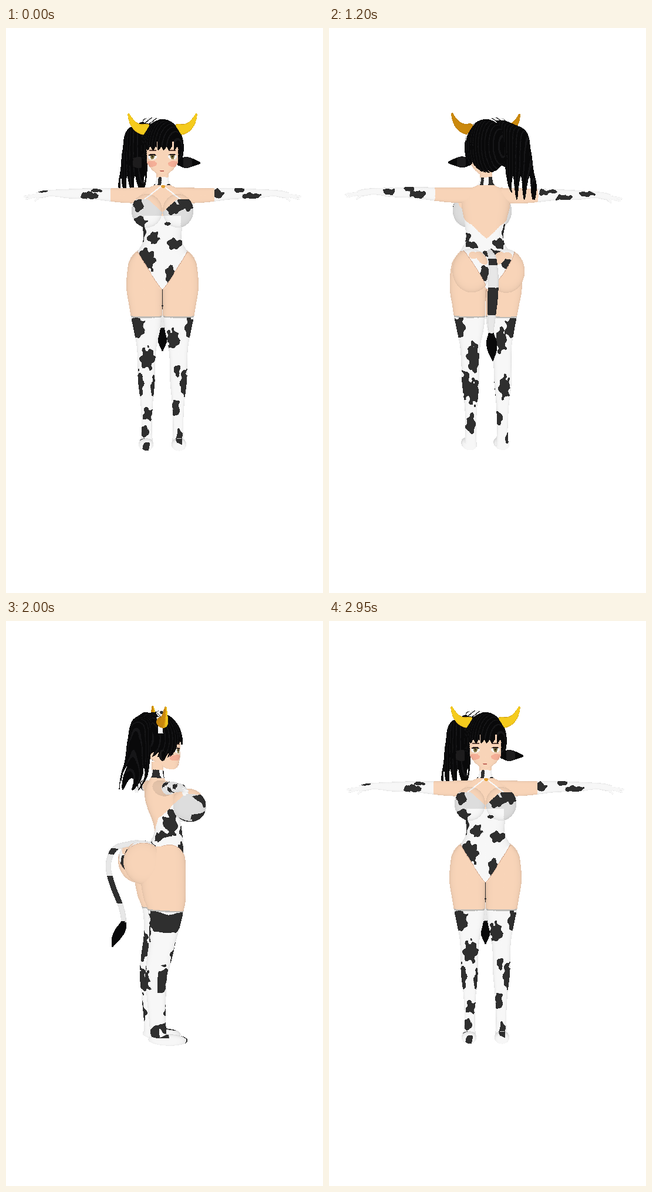
An HTML page with a canvas that plays this animation: 540x960 px, repeating every 3200 ms.

```html
<!DOCTYPE html>
<html>
<head>
<meta charset="utf-8">
<style>
html, body { margin: 0; width: 100%; height: 100%; overflow: hidden; background: #fff; }
canvas { display: block; }
</style>
</head>
<body>
<canvas id="stage" width="540" height="960"></canvas>
<script>
// A turntable figure: surfaces are sampled once into coloured points,
// then rotated and depth-tested per pixel.
const W = 540, H = 960, AXIS = 266, STEP = 0.62, FAR = 1900, LOOP = 3200;
const { sin, cos, abs, max, min, hypot, ceil, PI } = Math;

const WHITE = [248, 248, 248], DARK = [48, 48, 48], BLACK = [10, 10, 11];
const SKIN = [249, 213, 185], BLUSH = [246, 176, 152], GREY = [222, 222, 222];

// Spots: x, y, side (1 front, -1 back, 0 both), half width, half height
const bodySpots = [
  [-15, 356, 1, 9, 10], [21, 367, 1, 12, 9], [-26, 394, 1, 13, 19], [14, 421, 1, 9, 18],
  [-40, 301, 1, 8, 10], [-37, 327, 1, 10, 8], [19, 306, 1, 13, 10], [38, 299, 1, 12, 11],
  [8, 332, 1, 6, 3], [-32, 347, 0, 4, 13], [32, 355, -1, 6, 7],
  [24, 369, -1, 10, 6], [-21, 366, -1, 10, 9], [-8, 384, -1, 17, 7],
  [-25, 398, -1, 7, 12], [10, 414, -1, 8, 13],
  [-126, 284, 1, 16, 6], [-112, 276, 0, 9, 3], [-204, 277, 1, 10, 2], [94, 281, 1, 9, 7],
  [152, 285, 1, 16, 5], [131, 275, 0, 10, 4], [-134, 286, -1, 15, 5], [-96, 278, -1, 8, 5],
  [118, 284, -1, 14, 6], [165, 280, -1, 11, 5], [-172, 279, -1, 13, 4]
];
const legSpots = [
  [-42, 507, 0, 12, 19], [-25, 560, 1, 12, 18], [-39, 606, 1, 7, 22], [-16, 612, 1, 4, 18],
  [-25, 656, 1, 8, 11], [-30, 686, 1, 6, 9], [-27, 706, 1, 6, 7], [47, 507, 0, 9, 19],
  [18, 527, 1, 11, 16], [25, 580, 1, 5, 10], [37, 602, 0, 7, 22], [23, 645, 1, 6, 16],
  [29, 693, 1, 5, 11], [24, 557, -1, 10, 24], [24, 614, -1, 10, 20], [28, 667, -1, 7, 16],
  [-23, 528, -1, 9, 20], [-28, 606, -1, 9, 18], [-20, 658, -1, 5, 11], [-35, 694, -1, 5, 11]
];

const points = [];

function put(x, y, z, nx, nz, paint) {
  const c = paint(x, y, z, nx, nz);
  if (c) points.push(x, y, z, nx, nz, c[0], c[1], c[2]);
}

function ball(x, y, z, rx, ry, rz, paint) {
  const rows = ceil(PI * max(rx, ry, rz) / STEP);
  for (let i = 0; i <= rows; i++) {
    const a = PI * i / rows, r = sin(a), cols = ceil(2 * PI * max(rx, rz) * r / STEP) + 1;
    for (let j = 0; j < cols; j++) {
      const b = 2 * PI * j / cols, nx = r * cos(b), nz = r * sin(b);
      put(x + rx * nx, y - ry * cos(a), z + rz * nz, nx, nz, paint);
    }
  }
}

// Smooth curve through rows, with the first column as parameter
function rowAt(rows, i, f) {
  const p = rows[i], q = rows[i + 1], before = rows[max(0, i - 1)], after = rows[min(rows.length - 1, i + 2)];
  const d = q[0] - p[0], f2 = f * f, f3 = f2 * f;
  return p.map((v, k) => {
    const m = d * (q[k] - before[k]) / (q[0] - before[0]);
    const n = d * (after[k] - v) / (after[0] - p[0]);
    return (2 * f3 - 3 * f2 + 1) * v + (f3 - 2 * f2 + f) * m + (3 * f2 - 2 * f3) * q[k] + (f3 - f2) * n;
  });
}

// Rows: position along, centre across, radius across, front z, back z
function tube(rows, paint, side = 1, sideways = false) {
  for (let i = 0; i < rows.length - 1; i++) {
    const jump = rows[i].map((v, k) => abs(rows[i + 1][k] - v));
    const count = ceil((jump[0] + jump[2] + max(jump[3], jump[4]) * 0.6) / STEP);
    for (let s = 0; s < count; s++) {
      const [along, mid, r, front, back] = rowAt(rows, i, s / count);
      const depth = (front - back) / 2, cols = ceil(2 * PI * max(r, depth) / STEP);
      for (let j = 0; j < cols; j++) {
        const a = 2 * PI * j / cols, c = cos(a), n = sin(a);
        const across = mid + r * c, z = (front + back) / 2 + depth * n;
        if (sideways) put(side * along, across, z, 0, n, paint);
        else put(side * across, along, z, side * c, n, paint);
      }
    }
  }
}

function cloth(spots, x, y, nz, base = WHITE) {
  const wobble = 0.16 * sin(y * 0.42 + x * 0.3) + 0.12 * sin(x * 0.6 - y * 0.21);
  for (const [cx, cy, s, rx, ry] of spots)
    if (abs(y - cy) < ry * 1.3 && s * nz >= 0 && hypot((x - cx) / rx, (y - cy) / ry) + wobble < 1) return DARK;
  return base;
}

function bodyPaint(x, y, z, nx, nz, base) {
  const w = abs(x);
  if (y < 267) {
    if (y < 253) return SKIN;
    return sin(x * 0.4 + z * 0.3) < -0.1 ? DARK : WHITE;
  }
  if (nz > 0 && hypot(x - 1, y - 269) < 3) return [226, 160, 50];
  const top = 291 + 22 * max(0, 1 - w / 24) + max(0, 30 - z) * 1.05;
  if (y < top) return nz > 0 && y < 293 && abs(w - (y - 267) * 1.25) < 1.7 ? WHITE : SKIN;
  if (y > 378) {
    const edge = 41 * max(0, (442 - y) / 62) ** 0.9;
    if (w > edge) return w < edge + 1.2 ? [216, 176, 152] : SKIN;
  }
  return cloth(bodySpots, x, y, nz, base);
}
const bustPaint = (x, y, z, nx, nz) => bodyPaint(x, y, z, nx, nz, y > 318 && abs(x) < 30 ? WHITE : GREY);

function legPaint(x, y, z, nx, nz) {
  if (y < 488) return bodyPaint(x, y, z, nx, nz);
  return y < 490 ? [190, 188, 184] : cloth(legSpots, x, y, nz);
}
const armPaint = (x, y, z, nx, nz) => abs(x) < 88 ? SKIN : cloth(bodySpots, x, y, nz);

function facePaint(x, y, z, nx, nz) {
  if (nz < 0.2) return SKIN;
  const ex = abs(x) - 16.5, ey = y - 218;
  if (ex * ex / 56 + ey * ey / 24 < 1) {
    if (ey < -2.4) return [40, 30, 28];
    if (ex * ex / 11 + ey * ey / 18 < 1) return hypot(ex, ey) < 1.5 ? [50, 44, 24] : [140, 126, 74];
    return WHITE;
  }
  if (abs(y - 207.5) < 0.7 && abs(ex) < 6) return [90, 64, 54];
  if (abs(x + 1) < 3.5 && abs(y - 242) < 0.8) return [196, 104, 92];
  return hypot((abs(x) - 18) / 9, (y - 230) / 5) < 1 ? BLUSH : SKIN;
}

const strand = (x, y, z) => sin(x * 0.9 + z * 0.7 + y * 0.05) > 0.75 ? [23, 23, 25] : BLACK;

function hairPaint(x, y, z, nx, nz) {
  if (nz > 0.1 && abs(x) < 27 && y > 204 + 3 * sin(x * 0.7)) return null;
  if (nz > 0.1 && y > 192 && (abs(x - 18) < 1.8 || abs(x + 9) < 0.8)) return null;
  const end = z > 8 ? 238 : z > -28 ? 227 : 245;
  if (y > end + 4 * sin(x + z)) return null;
  return abs(z + 10) < 4 && y < 191 && abs(x) > 20 ? WHITE : strand(x, y, z);
}
const tailHairPaint = (x, y, z) => y > 270 + 20 * sin(x * 0.45 + z * 0.15) ? null : strand(x, y, z);
const hornPaint = (x, y, z, nx, nz) => nz > 0.25 ? [246, 204, 30] : nz > -0.1 ? [224, 160, 18] : [204, 138, 14];
const tailPaint = (x, y) => (y > 437 && y < 482) || (y > 391 && y < 401) ? DARK : [232, 232, 232];

// Torso and head
tube([[240, 0, 10, 0, -18], [262, 0, 11, 2, -18], [268, 0, 16, 3, -20], [274, 0, 30, 6, -23],
  [282, 0, 40, 14, -27], [300, 0, 41, 20, -29], [320, 0, 37, 24, -24], [340, 0, 33, 30, -16],
  [360, 0, 32, 33, -13], [378, 0, 41, 35, -22], [395, 0, 54, 33, -40], [405, 0, 53, 33, -40],
  [420, 0, 40, 33, -38], [442, 0, 6, 24, -20]], bodyPaint);
tube([[185, 0, 26, 28, -38], [205, 0, 28, 30, -38], [225, 0, 27, 30, -32], [238, 0, 19, 28, -14],
  [246, 0, 10, 25, 0], [250, 0, 2, 20, 10]], facePaint);
ball(0, 203, -8, 36, 48, 42, hairPaint);
ball(-18, 157, -7, 15, 5, 6, (x, y) => sin(x * 0.7 + y) > 0.7 ? DARK : WHITE);
tube([[157, -22, 8, -22, -36], [172, -41, 19, -26, -58], [205, -47, 22, -28, -67], [240, -50, 23, -32, -72],
  [268, -54, 23, -38, -80], [296, -58, 14, -56, -84]], tailHairPaint);

for (const side of [-1, 1]) {
  ball(side * 26, 310, 40, 25, 28, 29, bustPaint);
  ball(side * 29, 411, -38, 31, 36, 33, bodyPaint);
  tube([[383, 28, 18, 25, -22], [400, 30, 27, 32, -40], [440, 31, 30, 33, -42], [470, 29, 27.5, 33, -37],
    [488, 27.5, 26, 30, -30], [510, 26.5, 22.5, 25, -27], [540, 27, 16.5, 17, -27], [570, 27.5, 14.5, 10, -31],
    [600, 27.5, 14, 2, -34], [640, 27, 10, 0, -31], [680, 27, 8.5, 0, -27], [708, 27, 10, 2, -26]], legPaint, side);
  ball(side * 28, 706, 4, 12, 9, 33, legPaint);

  // Arm and fingers
  tube([[25, 283, 12, 4, -22], [55, 284, 12.5, 4, -20], [86, 283, 11, 3, -18], [120, 281, 9, 1, -16],
    [160, 281, 7.5, 0, -15], [190, 280, 5, -3, -13], [205, 282, 5.5, -3, -13], [216, 284, 4.5, -4, -12]],
    armPaint, side, true);
  for (const [x, y] of [[237, 286], [234, 290], [218, 293]])
    for (let f = 0; f <= 1; f += 0.06)
      ball(side * (206 + (x - 206) * f), 282 + (y - 282) * f, -8, 2.2 - f, 2.2 - f, 2.5, () => WHITE);

  // Horn and ear
  for (let t = 0; t <= 1; t += 0.025) {
    const r = 8.5 * (1 - t) ** 0.8 + 0.8, k = 2 * t * (1 - t);
    ball(side * (28 * (1 - t) ** 2 + 50 * k + 58 * t * t), 172 * (1 - t) ** 2 + 173 * k + 145 * t * t, -6, r, r, r, hornPaint);
  }
  tube([[26, 228, 4, -5, -11], [40, 228, 9, -4, -12], [52, 228, 6, -5, -11], [65, 229, 0.6, -7, -9]],
    x => abs(x) > 36 && abs(x) < 50 ? [30, 29, 30] : BLACK, side, true);
}

// Tail with its tuft: y, z, half width
const tailPath = [[380, -52, 4], [388, -78, 6], [405, -90, 7], [425, -93, 8], [455, -85, 8], [490, -71, 6],
  [513, -67, 4], [527, -72, 8], [540, -79, 7], [553, -86, 1]];
for (let i = 0; i < tailPath.length - 1; i++)
  for (let f = 0; f < 1; f += 0.07) {
    const [y, z, r] = rowAt(tailPath, i, f);
    ball(0, y, z, r, 4, y > 513 ? r : 4, y > 513 ? () => BLACK : tailPaint);
  }

const cloud = new Float32Array(points);
const ctx = document.getElementById("stage").getContext("2d");
const image = ctx.createImageData(W, H);
const pixels = new Uint32Array(image.data.buffer), depths = new Float32Array(W * H);

function draw(angle) {
  const s = sin(angle), c = cos(angle), roll = 0.06 * min(1, 1.8 * abs(s));
  pixels.fill(0xffffffff);
  depths.fill(-1e9);
  for (let i = 0; i < cloud.length; i += 8) {
    const facing = cloud[i + 3] * s + cloud[i + 4] * c;
    if (facing < -0.4) continue;
    const x = cloud[i], y = cloud[i + 1], z = cloud[i + 2];
    const depth = x * s + z * c, zoom = 1 + depth / FAR, sx = (x * c - z * s) * zoom;
    const sy = y + max(0, y - 370) * (zoom - 1) + roll * sx;
    const at = (sy + 0.5 | 0) * W + (AXIS + sx + 0.5 | 0);
    if (depth <= depths[at]) continue;
    depths[at] = depth;
    const light = 1 - 0.13 * (1 - max(0, facing)) ** 2;
    pixels[at] = 0xff000000 | cloud[i + 7] * light << 16 | cloud[i + 6] * light << 8 | cloud[i + 5] * light;
  }
  ctx.putImageData(image, 0, 0);
}

// Time in ms and heading in degrees, with short rests
const keys = [[0, 0], [100, 0], [600, 58], [650, 58], [800, 77], [1200, 172], [1250, 172], [1500, 208], [1550, 208],
  [1800, 240], [1850, 240], [2000, 259], [2400, 306], [2450, 306], [2950, 360], [LOOP, 360]];

function heading(t) {
  const i = keys.findIndex(k => k[0] > t), [t0, a0] = keys[i - 1], [t1, a1] = keys[i];
  return a0 + (a1 - a0) * (t - t0) / (t1 - t0);
}

let shown = -1;
function tick() {
  const angle = heading(Math.floor(performance.now() % LOOP / 50) * 50);
  if (angle !== shown) draw((shown = angle) * PI / 180);
  requestAnimationFrame(tick);
}
tick();
</script>
</body>
</html>
```
